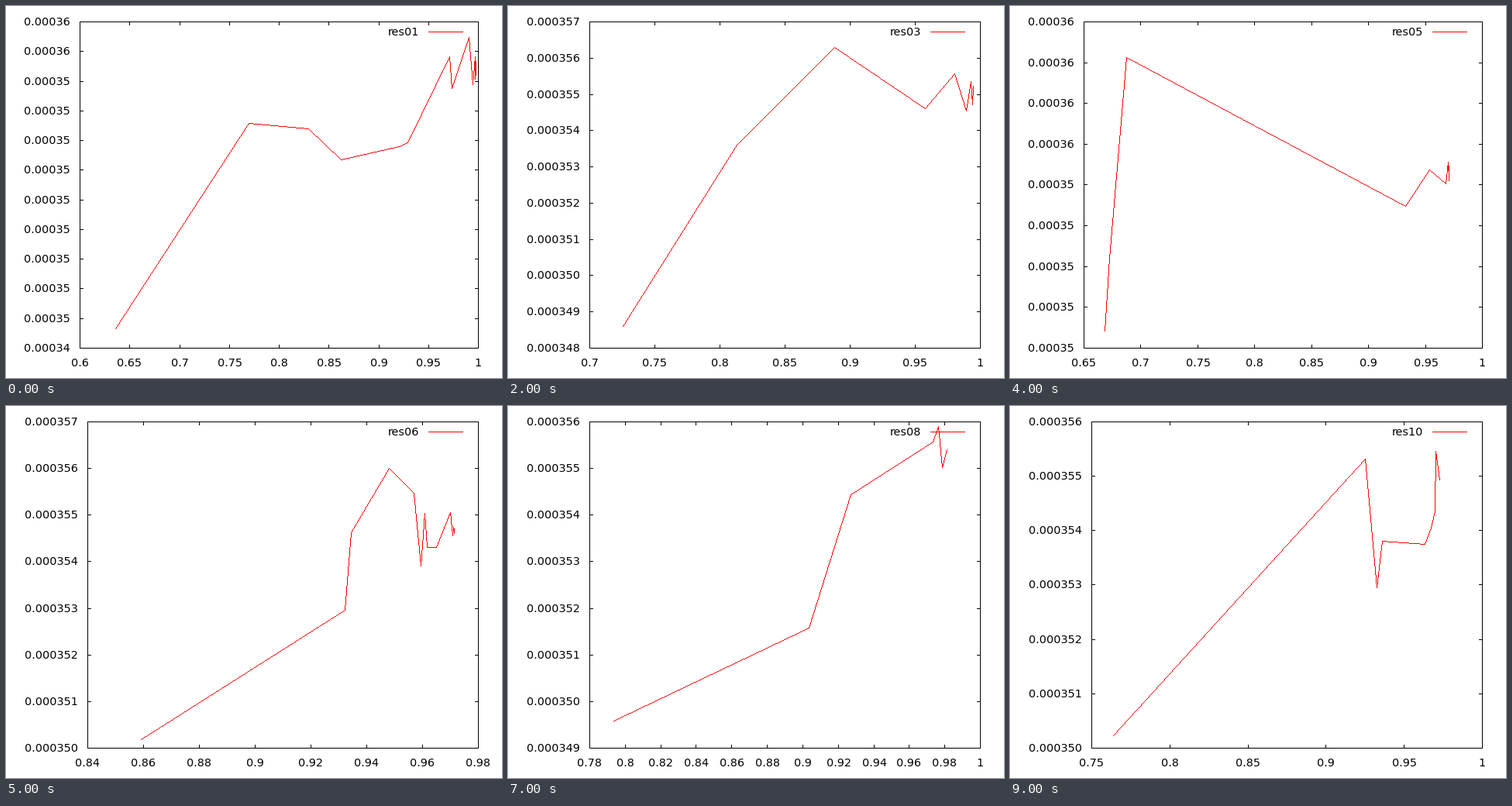
Animation, 640 px wide and 480 px high, one loop 10000 ms. Source, as a matplotlib script:

```python
import math

import numpy as np
import matplotlib.pyplot as plt
from matplotlib.animation import FuncAnimation

W, H, DPI = 640, 480, 100
RIGHT, TOP, BOTTOM = 609, 20, 441
TIC = 4
BLACK, RED = (0, 0, 0), (255, 0, 0)

plt.rcParams["font.family"] = "DejaVu Sans"
plt.rcParams["font.size"] = 14.4 * 72 / DPI

runs = []


def settle(start, x_end, y_end, swing, count=5):
    """Points that crowd towards an end while their swing dies down."""
    return [(x_end + (start - x_end) * 0.4 ** k,
             y_end - swing * (-0.8) ** k) for k in range(1, count + 1)]


def add(*keys, tail=None, coarse=False):
    """Store one run: x as a ratio, y in millionths."""
    points = list(keys)
    if tail:
        points += settle(keys[-1][0], *tail)
    runs.append((points, coarse))


add((.6358, 345.65), (.7696, 352.58), (.8296, 352.39), (.8623, 351.35),
    (.9206, 351.79), (.9292, 351.92), (.9712, 354.82), (.9735, 353.75),
    (.9907, 355.48), tail=(.9977, 354.4, -.65), coarse=True)
add((.7202, 356.69), (.8250, 352.735), (.9363, 353.86), (.9429, 353.64),
    (.9577, 353.70), (.9601, 354.34), (.9619, 353.91), (.9690, 354.21),
    (.9762, 353.70), (.9857, 354.41), (.9893, 354.01), (.9929, 354.89),
    tail=(.9951, 354.71, -.12))
add((.7256, 348.6), (.8130, 353.6), (.8881, 356.3), (.9580, 354.6),
    tail=(.995, 355, .7))
add((.6861, 347.17), (.7778, 352.85), (.8118, 352.93), (.8188, 352.47),
    (.8535, 350.59), (.8958, 351.66), (.8993, 351.80), (.9236, 352),
    (.9500, 353.56), (.9528, 353.25), (.9579, 353.6), (.9590, 354.18),
    (.9604, 353.29), (.9660, 353.65))
add((.6684, 350.42), (.6725, 352.20), (.6875, 357.13), (.9326, 353.48),
    (.9537, 354.37), (.9680, 354.03), tail=(.971, 354.3, .32), coarse=True)
add((.8592, 350.18), (.9322, 352.96), (.9344, 354.62), (.9481, 356.01),
    (.9569, 355.47), (.9594, 353.91), (.9608, 355.04), (.9617, 354.31),
    (.9650, 354.31), (.9700, 355.05), tail=(.9714, 354.66, -.12))
add((.7730, 350.3), (.8900, 353.2), (.9350, 355), (.9560, 354.3),
    tail=(.978, 355.1, .5))
add((.7935, 349.58), (.9035, 351.58), (.9271, 354.44), (.9734, 355.57),
    (.9764, 355.90), (.9786, 355.02), (.9812, 355.40))
add((.7200, 349.4), (.8470, 353.1), (.8940, 356.3), (.9330, 354.5),
    tail=(.977, 355.3, .5))
add((.7639, 350.23), (.9251, 355.32), (.9325, 352.95), (.9360, 353.81),
    (.9633, 353.75), (.9673, 354.05), (.9697, 354.36), (.9702, 355.46),
    (.9727, 354.93))


class Axis:
    """Range widened to whole ticks and mapped onto a pixel length."""

    def __init__(self, values, length):
        span = max(values) - min(values)
        power = 10 ** math.floor(math.log10(span))
        room = 20 * power / span
        self.step = power * (0.2 if room > 10 else 0.5 if room > 4 else 1)
        self.first = math.floor(min(values) / self.step)
        self.last = math.ceil(max(values) / self.step)
        self.length = length

    def pixel(self, value):
        part = (value / self.step - self.first) / (self.last - self.first)
        return math.floor(part * self.length + 0.5)

    def ticks(self):
        for k in range(self.first, self.last + 1):
            yield k * self.step, self.pixel(k * self.step)


def trace(img, points, color):
    """Draw a one pixel wide polyline without smoothing."""
    for (x0, y0), (x1, y1) in zip(points, points[1:]):
        n = max(abs(x1 - x0), abs(y1 - y0)) + 1
        xs = np.rint(np.linspace(x0, x1, n)).astype(int)
        ys = np.rint(np.linspace(y0, y1, n)).astype(int)
        img[ys, xs] = color


def ylabel(value, coarse):
    if coarse:
        return f"0.{round(value / 10):05d}"
    return f"0.{math.floor(value + 0.5):06d}"


fig = plt.figure(figsize=(W / DPI, H / DPI), dpi=DPI, facecolor="white")
ax = fig.add_axes([0, 0, 1, 1])
ax.axis("off")
canvas = ax.imshow(np.full((H, W, 3), 255, np.uint8),
                   interpolation="nearest", aspect="auto")
ax.set_xlim(-0.5, W - 0.5)
ax.set_ylim(H - 0.5, -0.5)
labels = []


def write(x, y, text, align):
    labels.append(ax.text(x, y + 4.5, text, ha=align, va="baseline",
                          color="black"))


def draw(i):
    while labels:
        labels.pop().remove()
    points, coarse = runs[i]
    left = 95 if coarse else 105
    xs, ys = zip(*points)
    xaxis, yaxis = Axis(xs, RIGHT - left), Axis(ys, BOTTOM - TOP)
    img = np.full((H, W, 3), 255, np.uint8)

    for value, up in yaxis.ticks():
        y = BOTTOM - up
        trace(img, [(left, y), (left + TIC, y)], BLACK)
        trace(img, [(RIGHT - TIC, y), (RIGHT, y)], BLACK)
        write(left - 12.5, y, ylabel(value, coarse), "right")
    for value, across in xaxis.ticks():
        x = left + across
        trace(img, [(x, TOP), (x, TOP + TIC)], BLACK)
        trace(img, [(x, BOTTOM - TIC), (x, BOTTOM)], BLACK)
        write(x, 460, f"{value:g}", "center")
    trace(img, [(left, TOP), (RIGHT, TOP), (RIGHT, BOTTOM),
                (left, BOTTOM), (left, TOP)], BLACK)

    write(532.5, 33, f"res{i + 1:02d}", "right")
    trace(img, [(545, 33), (589, 33)], RED)
    trace(img, [(left + xaxis.pixel(x), BOTTOM - yaxis.pixel(y))
                for x, y in points], RED)
    canvas.set_data(img)
    return [canvas, *labels]


anim = FuncAnimation(fig, draw, frames=len(runs), interval=1000,
                     init_func=lambda: draw(0), repeat=True, repeat_delay=0)
plt.show()
```
